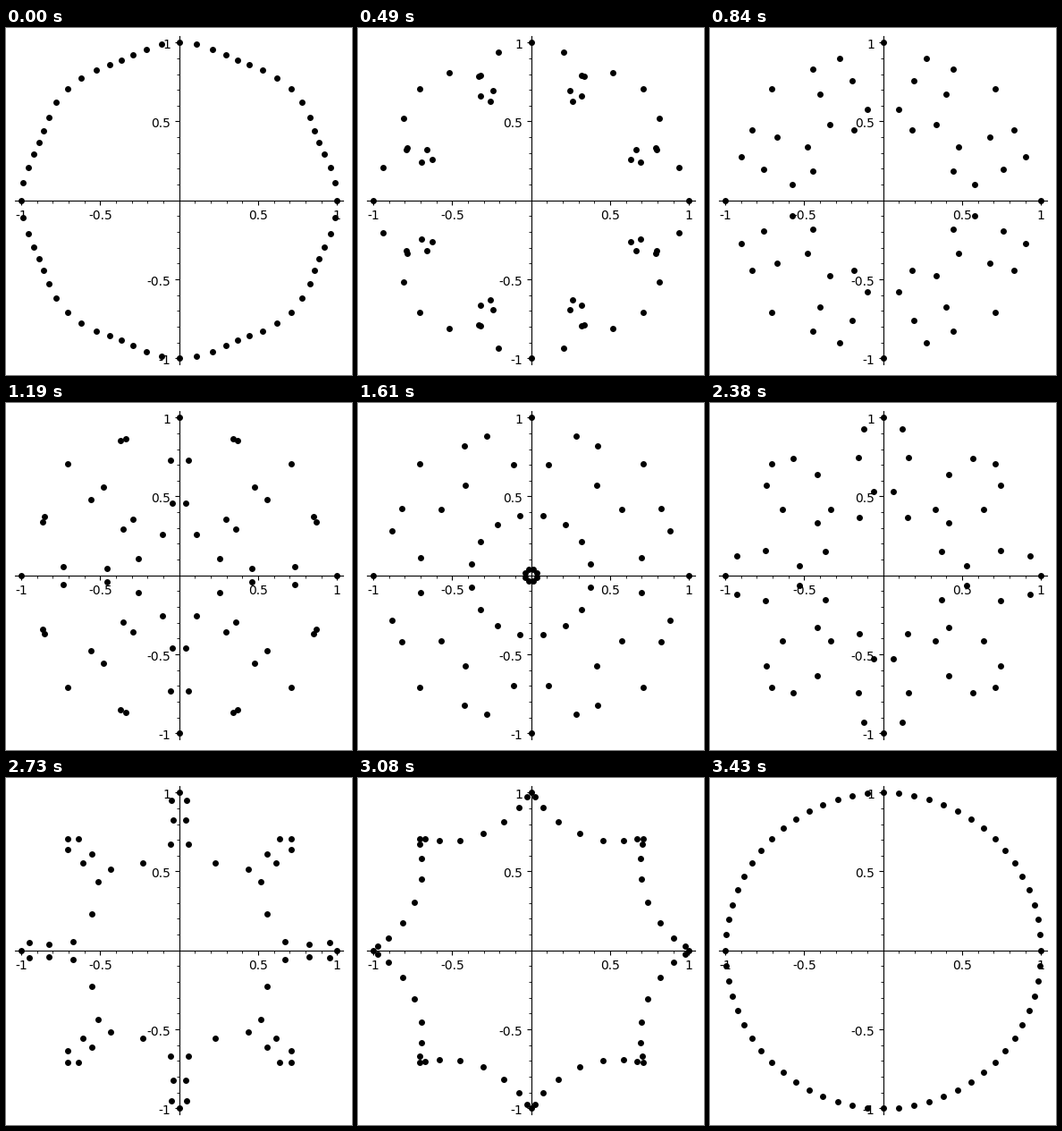
Animation of 387 by 388 pixels, one loop 3.5 s. Source, as a matplotlib script:

```python
import numpy as np
import matplotlib.pyplot as plt
from matplotlib.animation import FuncAnimation
from matplotlib.ticker import FixedLocator, FuncFormatter, MultipleLocator
from matplotlib.transforms import ScaledTranslation

WIDTH, HEIGHT, DPI = 387, 388, 100
FRAMES, INTERVAL = 50, 70
POINTS = 64
LIMIT = 1.04
UNIT = 176.575                       # pixels per data unit
CENTER_X, CENTER_Y = 193.758, 192.78  # origin, measured from the top left
LABEL_DROP = 1.04                    # pixels the y labels sit below their ticks

plt.rcParams["font.family"] = "DejaVu Sans"

angles = 2 * np.pi * np.arange(POINTS) / POINTS
slow, fast = np.exp(1j * angles), np.exp(9j * angles)


def positions(frame):
    """Blend each point linearly from its slow orbit to the ninefold one."""
    mix = (frame + 1) / FRAMES
    z = (1 - mix) * slow + mix * fast
    return np.column_stack([z.real, z.imag])


def tick_label(value, _):
    return f"{value:g}"


fig = plt.figure(figsize=(WIDTH / DPI, HEIGHT / DPI), dpi=DPI, facecolor="white")
half = LIMIT * UNIT
ax = fig.add_axes([
    (CENTER_X - half) / WIDTH,
    (HEIGHT - CENTER_Y - half) / HEIGHT,
    2 * half / WIDTH,
    2 * half / HEIGHT,
])
ax.set(xlim=(-LIMIT, LIMIT), ylim=(-LIMIT, LIMIT))

for side in ("top", "right"):
    ax.spines[side].set_visible(False)
for side in ("bottom", "left"):
    ax.spines[side].set_position("zero")
for axis in (ax.xaxis, ax.yaxis):
    axis.set_major_locator(FixedLocator([-1, -0.5, 0.5, 1]))
    axis.set_minor_locator(MultipleLocator(0.1))
    axis.set_major_formatter(FuncFormatter(tick_label))

drop = ScaledTranslation(0, -LABEL_DROP / DPI, fig.dpi_scale_trans)
for label in ax.get_yticklabels():
    label.set_transform(label.get_transform() + drop)

start = positions(0)
dots = ax.scatter(start[:, 0], start[:, 1], s=25, c="black",
                  linewidths=0, clip_on=False)


def update(frame):
    dots.set_offsets(positions(frame))
    return (dots,)


animation = FuncAnimation(fig, update, frames=FRAMES, interval=INTERVAL,
                          repeat=True, repeat_delay=0)
plt.show()
```
